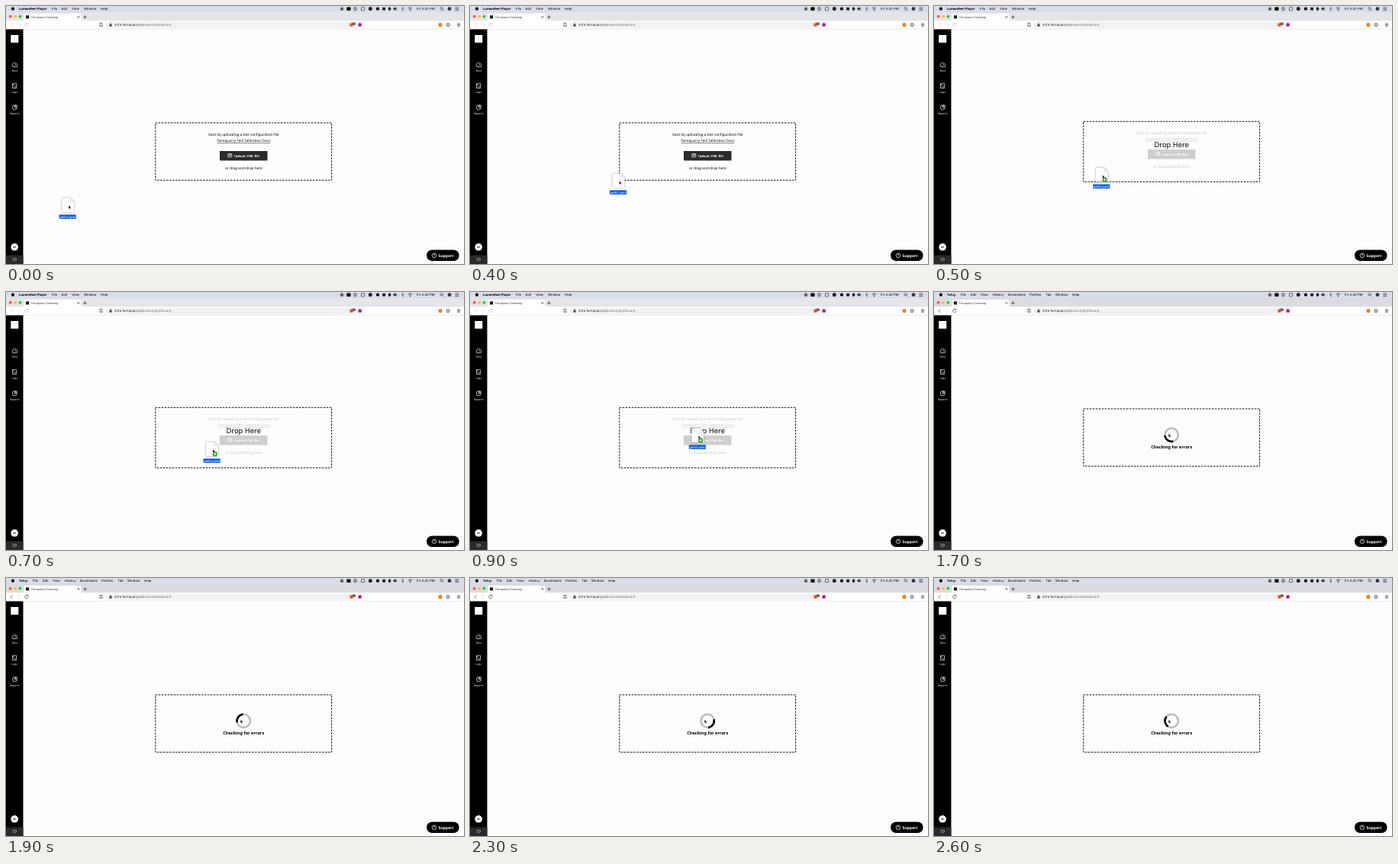
Write an HTML page that moves like this. It is 600 by 338 pixels and loops after 2700 ms.

```html
<!DOCTYPE html>
<html lang="en">
<head>
<meta charset="utf-8">
<title>Upload a test file</title>
<style>
  html, body { margin: 0; width: 100%; height: 100%; overflow: hidden; background: #fff; }
  svg { display: block; }
  text { font-family: "Noto Sans", "Open Sans", sans-serif; font-size: 4.7px; text-rendering: geometricPrecision; }
  .ui text { font-family: Inter, Roboto, sans-serif; font-size: 4.3px; }
  .ui .app { font-size: 4.2px; font-weight: 700; }
  .ui .tab { font-size: 3.65px; }
  .mid { text-anchor: middle; }
  .bold { font-weight: 600; }
  .line { fill: none; stroke: #333; stroke-width: .7; }
  .side { stroke: #fff; }
  .nav text { font-size: 3.4px; fill: #fff; text-anchor: middle; }
</style>
</head>
<body>
<svg width="600" height="338" viewBox="0 0 600 338">
  <rect width="600" height="338" fill="#fdfdfd"/>

  <g class="ui">
    <!-- menu bar -->
    <rect width="600" height="8" fill="#d9dcea"/>
    <circle cx="9" cy="3.7" r="2.1"/>
    <g id="playerMenu">
      <text class="app" x="17" y="5.2">LumenReel Player</text>
      <text x="60" y="5.2">File</text><text x="72.5" y="5.2">Edit</text><text x="86" y="5.2">View</text>
      <text x="102" y="5.2">Window</text><text x="124" y="5.2">Help</text>
    </g>
    <g id="browserMenu">
      <text class="app" x="17" y="5.2">Tolvy</text>
      <text x="35" y="5.2">File</text><text x="48" y="5.2">Edit</text><text x="61" y="5.2">View</text>
      <text x="77" y="5.2">History</text><text x="97" y="5.2">Bookmarks</text><text x="125" y="5.2">Profiles</text>
      <text x="146.5" y="5.2">Tab</text><text x="159" y="5.2">Window</text><text x="181" y="5.2">Help</text>
    </g>
    <circle cx="440" cy="3.7" r="2" class="line"/><circle cx="440" cy="3.7" r="1"/>
    <rect x="446.3" y="1.5" width="5.2" height="4.4" rx="1"/>
    <circle cx="457.5" cy="3.7" r="2.1" class="line"/><path d="M457.5 2.3V5" class="line"/>
    <rect x="465.4" y="1.6" width="4.2" height="4.2" rx=".8" class="line"/>
    <circle cx="477.3" cy="3.7" r="2.4"/>
    <circle cx="487" cy="3.7" r="2.1"/>
    <rect x="493.3" y="1.9" width="3.6" height="3.6"/>
    <path d="M502.5 1l2 2.7l-2 2.7l-2-2.7z"/>
    <path d="M507.5 2.8h1.2l1.8-1.5v4.8l-1.8-1.5h-1.2z"/><path d="M511.5 2.3q1.3 1.4 0 2.8" class="line"/>
    <path d="M518 2.4l3.2 2.6l-1.6 1.3v-5.2l1.6 1.3l-3.2 2.6" class="line" stroke-width=".4" opacity=".6"/>
    <path d="M526.8 2.9q2.7-2.4 5.4 0M527.9 4.2q1.6-1.4 3.2 0" class="line"/><circle cx="529.5" cy="5.5" r=".7"/>
    <text x="538" y="5.2">Fri 4:42 PM</text>
    <circle cx="570.6" cy="3.3" r="1.6" class="line"/><path d="M571.8 4.5l1.6 1.6" class="line"/>
    <circle cx="581" cy="3.7" r="2.4" fill="#34344a"/>
    <path d="M588.3 2h5M588.3 3.8h5M588.3 5.6h5" class="line"/>

    <!-- tab strip -->
    <rect id="strip" y="8" width="600" height="11.5"/>
    <circle cx="5.7" cy="13.8" r="2" fill="#fc5b57"/>
    <circle cx="12.1" cy="13.8" r="2" fill="#fdbc40"/>
    <circle cx="18.4" cy="13.8" r="2" fill="#34c84a"/>
    <path d="M22 19.5q1.5 0 1.5-1.5v-6q0-2 2-2h71q2 0 2 2v6q0 1.5 1.5 1.5z" fill="#fff"/>
    <rect x="26" y="12.3" width="4.2" height="4.2" fill="#222"/>
    <text class="tab" x="33" y="15.7" fill="#333">Fernquarry Dawning</text>
    <path d="M93.6 13.1l2.6 2.6m0-2.6l-2.6 2.6M103.5 12.2v4.6m-2.3-2.3h4.6" class="line" stroke-width=".5"/>

    <!-- toolbar -->
    <rect y="19.5" width="600" height="10.7" fill="#fff"/>
    <path d="M0 30.3H600" stroke="#d4d4d4" stroke-width=".5"/>
    <rect x="131" y="20.5" width="338.5" height="8.6" rx="1.3" fill="#f1f2f4"/>
    <g id="navButtons" fill="none" stroke-width=".7">
      <path d="M8.3 22.3l-2.2 2.3l2.2 2.3"/>
      <path d="M28.6 23.3a2.2 2.2 0 1 0 .4 1.8M29 22v1.6h-1.6"/>
    </g>
    <path d="M16 22.3l2.2 2.3l-2.2 2.3" fill="none" stroke="#c4c4c4" stroke-width=".7"/>
    <path d="M123 22.3h3v4.6l-1.5-1.2l-1.5 1.2z" class="line"/>
    <rect x="135.4" y="24.1" width="3.2" height="2.6" fill="#444"/>
    <path d="M136.1 24.2v-.9q.9-1.4 1.8 0v.9" class="line" stroke-width=".5"/>
    <text x="142" y="26.1" fill="#222">infra.fernquarry.io/<tspan fill="#777">team4/dashboard</tspan></text>
    <path d="M447.4 21v7.5M459.5 21v7.5" stroke="#ddd" stroke-width=".4"/>
    <circle cx="452.5" cy="24.7" r="2.4" fill="#f4511e"/>
    <rect x="453.6" y="21.4" width="4.2" height="3.6" rx=".8" fill="#666"/>
    <circle cx="463.6" cy="24.7" r="2.4" fill="#a0288c"/>
    <circle cx="569" cy="24.7" r="2.6" fill="#e8822a"/>
    <circle cx="579" cy="24.7" r="2.2" class="line"/><path d="M579 23.4v2.6" class="line"/>
    <path d="M591 23.1h4M591 24.7h4M591 26.3h4" class="line" stroke-width=".6"/>
  </g>

  <!-- sidebar -->
  <g class="nav">
    <rect y="30.5" width="22.5" height="307.5"/>
    <rect x="6.3" y="38" width="10" height="10" fill="#fff"/>
    <g class="line side">
      <path d="M8.9 79.6a3.2 3.2 0 1 1 5.2 0zM11.5 78l1.3-1.9" class="line side"/>
      <path d="M8.5 101.7h5.2v6h-5.2zM8.5 103.5h2.2M10.3 105.6l1 1l1.6-2" class="line side"/>
      <path d="M14.4 133a3 3 0 1 1-3-3.2v3.2zM12.6 129.4q2 .3 2.2 2.3h-2.2z" class="line side"/>
    </g>
    <text x="11.3" y="86.2">Tests</text>
    <text x="11.3" y="113.9">Logs</text>
    <text x="11.3" y="141.7">Reports</text>
    <circle cx="11.2" cy="315.8" r="4.8" fill="#fff"/>
    <text x="11.2" y="317" class="bold" style="fill:#000;font-size:3.2px">AY</text>
    <rect y="326.5" width="22.5" height="11.5" fill="#2a2a2a"/>
    <path d="M8.6 329.8l2.2 2.2l-2.2 2.2M11.6 329.8l2.2 2.2l-2.2 2.2" class="line side"/>
  </g>

  <!-- page -->
  <rect id="zone" x="195.8" width="230.8" fill="none" stroke="#111" stroke-width="1" stroke-dasharray="2.6 1.4"/>
  <g id="form" class="mid">
    <text x="311.3" y="169.7">Start by uploading a test configuration file</text>
    <text x="311.3" y="178" text-decoration="underline">Fernquarry Test Definition Docs</text>
    <rect x="280" y="190" width="62.5" height="12.5" fill="#2b2b2b"/>
    <path d="M291.9 198.1h-1v-4.2h4.8v4.2h-1M290.9 194.3h4.8M293.3 198.8v-2.8m-1.1 1l1.1-1.1l1.1 1.1" class="line side"/>
    <text x="315.5" y="197.8" class="bold" fill="#fff" style="font-size:4.1px">Upload .YML file</text>
    <text x="311.3" y="214.1">or drag and drop here</text>
  </g>
  <text id="dropHere" class="mid" x="311.2" y="185" style="font-size:9.4px">Drop Here</text>
  <g id="loader">
    <g fill="none" stroke-width="2.6">
      <circle cx="311.2" cy="187.2" r="8.7" stroke="#bcbcbc"/>
      <circle id="arc" cx="311.2" cy="187.2" r="8.7" stroke="#000" stroke-dasharray="15 60"/>
    </g>
    <text class="mid bold" x="311.2" y="204.7" style="font-size:5.6px">Checking for errors</text>
  </g>

  <!-- support button -->
  <rect x="551" y="319.5" width="42.6" height="14.5" rx="7.2"/>
  <circle cx="561" cy="326.8" r="2.8" class="line side"/>
  <text class="mid bold" x="561" y="328.3" fill="#fff" style="font-size:4.2px">?</text>
  <text class="mid bold" x="576.5" y="328.6" fill="#fff" style="font-size:5px">Support</text>

  <!-- pointer and dragged file; the pointer tip is the local zero point -->
  <g id="pointer">
    <g id="file">
      <path d="M-9-9.6H2l5 5V9H-9z" fill="#fff" opacity=".9" style="filter:drop-shadow(0 .6px 1px #0007)"/>
      <path d="M2-9.6v5h5z" fill="#eee" stroke="#ccc" stroke-width=".3"/>
      <rect x="-12.5" y="12.3" width="22.3" height="5.7" rx="1" fill="#1560d8"/>
      <text class="mid" x="-1.3" y="16.5" fill="#fff" style="font-size:4px">geth2.yaml</text>
    </g>
    <g id="badge">
      <circle cx="2.8" cy="6.3" r="3.2" fill="#2fa336"/>
      <path d="M1.1 6.3h3.4M2.8 4.6V8" stroke="#fff" stroke-width=".9"/>
    </g>
    <path d="M0 0v4.7l1.1-1l.8 1.8l.8-.4l-.8-1.7h1.5z" stroke="#fff" stroke-width=".4"/>
  </g>
</svg>
<script>
  const LOOP = 2700, STEP = 100, ENTER = 500, DROP = 1700;
  // time, x, y of the pointer tip
  const path = [[0, 82, 261], [400, 195.5, 229], [600, 246, 213.5], [700, 271, 206],
                [900, 299.3, 188], [1000, 304.5, 186.5], [1100, 307.2, 185.5], [LOOP, 307.2, 185.5]];
  const el = id => document.getElementById(id);
  const set = (id, attrs) => Object.entries(attrs).forEach(([k, v]) => el(id).setAttribute(k, v));
  const show = (id, on) => set(id, { visibility: on ? 'visible' : 'hidden' });

  function pointerAt(t) {
    const i = path.findIndex(p => p[0] > t);
    const [t0, x0, y0] = path[i - 1], [t1, x1, y1] = path[i];
    const k = (t - t0) / (t1 - t0);
    return [x0 + (x1 - x0) * k, y0 + (y1 - y0) * k];
  }

  function draw(t) {
    const checking = t >= DROP, over = t >= ENTER && !checking;
    show('playerMenu', !checking);
    show('browserMenu', checking);
    set('strip', { fill: checking ? '#dadce0' : '#e4e5e8' });
    set('navButtons', { stroke: checking ? '#444' : '#c4c4c4' });

    set('zone', over ? { y: 151.3, height: 79 } : { y: 153, height: 75.2 });
    show('form', !checking);
    set('form', { opacity: over ? .22 : 1, transform: `translate(0 ${over ? -2 : 0})` });
    show('dropHere', over);
    show('loader', checking);
    set('arc', { transform: `rotate(${166 + (t - 1900) * .45} 311.2 187.2)` });

    set('pointer', { transform: `translate(${pointerAt(t)})` });
    show('file', !checking);
    show('badge', over);
  }

  const start = performance.now();
  function tick() {
    const t = (performance.now() - start) % LOOP;
    draw(Math.floor(t / STEP) * STEP);
    requestAnimationFrame(tick);
  }
  tick();
</script>
</body>
</html>
```
